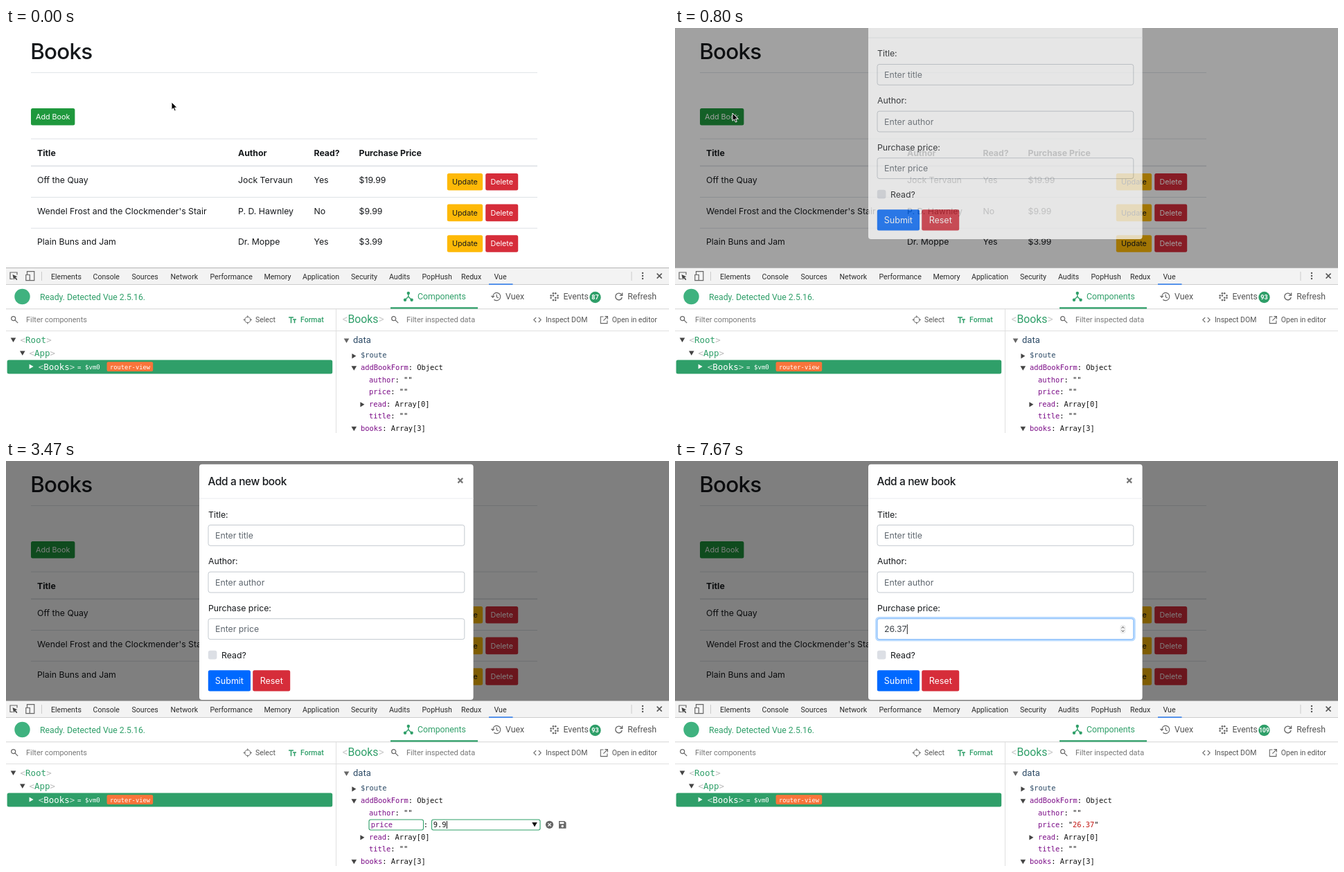
An HTML page that plays this animation: 957 px wide and 585 px high, repeating every 8 s.

```html
<!DOCTYPE html>
<html lang="en">
<head>
<meta charset="utf-8">
<title>Books</title>
<style>
html, body { margin: 0; width: 100%; height: 100%; overflow: hidden; background: #fff; }
svg { display: block; width: 100%; height: 100%; }
text { white-space: pre; }
.ui { font-family: Inter, sans-serif; }
.rb { font-family: Roboto, sans-serif; }
.mono { font-family: "DejaVu Sans Mono", monospace; }
</style>
</head>
<body>
<svg id="stage" viewBox="0 0 957 585"></svg>
<script>
const GREEN = '#2f9f69', INK = '#16191c', HINT = '#5f676f', RED = '#d62d3a', PURPLE = '#7b0c87', GRAY = '#666';
const stage = document.getElementById('stage');

// Markup helpers
const text = (cls, x, y, s, size, fill, more = '') =>
  `<text class="${cls}" x="${x}" y="${y}" font-size="${size}" fill="${fill}" ${more}>${s}</text>`;
const ui = (x, y, s, size = 12.3, fill = INK, more) => text('ui', x, y, s, size, fill, more);
const rb = (x, y, s, size = 10.5, fill = '#555', more) => text('rb', x, y, s, size, fill, more);
const mono = (x, y, s, fill = '#111', size = 10.4, more) => text('mono', x, y, s, size, fill, more);
const span = (s, fill) => `<tspan fill="${fill}">${s}</tspan>`;
const rect = (x, y, w, h, fill, r = 0, more = '') =>
  `<rect x="${x}" y="${y}" width="${w}" height="${h}" rx="${r}" fill="${fill}" ${more}/>`;
const path = (d, stroke, w = 1, fill = 'none', more = '') =>
  `<path d="${d}" stroke="${stroke}" stroke-width="${w}" fill="${fill}" ${more}/>`;
const group = (id, body, more = '') => `<g id="${id}" ${more}>${body}</g>`;
const button = (x, y, w, h, label, fill, size, ink = '#fff', id = '') =>
  rect(x, y, w, h, fill, 2.5, id && `id="${id}"`) +
  ui(x + w / 2, y + h / 2 + size * .365, label, size, ink, 'text-anchor="middle"');
const down = (x, y, fill = '#444') => path(`M${x - 3.8} ${y - 3}h7.6l-3.8 6.4z`, 'none', 0, fill);
const right = (x, y, fill = '#444') => path(`M${x - 2.6} ${y - 3.6}v7.2l6-3.6z`, 'none', 0, fill);
const search = (x, y) => path(`M${x + 1.2} ${y + 1.2}l4 4M${x + 1.7} ${y - 1.3}a3 3 0 1 1-6 0a3 3 0 1 1 6 0`, GRAY, 1.2);
const pencil = (x, y) => path(`M${x - 5} ${y + 5}v-2.4l6.3-6.3 2.4 2.4-6.3 6.3zM${x + 2.1} ${y - 4.5}l1.3-1.2 2.4 2.4-1.3 1.2z`, 'none', 0, GRAY);
const disc = (x, y, mark) => `<circle cx="${x}" cy="${y}" r="5.6" fill="${GRAY}"/>` + path(mark, '#fff', 1.2);

function page() {
  const books = [
    ['Off the Quay', 'Jock Tervaun', 'Yes', '$19.99'],
    ["Wendel Frost and the Clockmender's Stair", 'P. D. Hawnley', 'No', '$9.99'],
    ['Plain Buns and Jam', 'Dr. Moppe', 'Yes', '$3.99']
  ];
  const cols = [45, 335, 444.5, 509.5];
  const rule = (y, h = 1) => rect(36, y, 731, h, '#dee2e6');
  return rect(0, 0, 957, 346, '#fff') +
    ui(35.3, 44.6, 'Books', 31.4, INK, 'font-weight="500" letter-spacing="-.8"') +
    rule(64, .9) + rule(159.6) + rule(198.5, 1.7) + rule(244) + rule(288.7) +
    rect(35, 115, 65.4, 26.6, 'none', 3.5, 'id="glow" stroke="#28a745" stroke-opacity=".5" stroke-width="2"') +
    button(36, 116, 63.4, 24.5, 'Add Book', '#1f983d', 10.75, '#fff', 'add') +
    ['Title', 'Author', 'Read?', 'Purchase Price'].map((s, i) => ui(cols[i], 184.5, s, 12.3, INK, 'font-weight="700"')).join('') +
    books.map((b, r) => {
      const dy = r * 44.6;
      return b.map((s, i) => ui(cols[i], 224 + dy, s)).join('') +
        button(636.8, 210 + dy, 51.3, 24.6, 'Update', '#feb907', 10.75, INK) +
        button(692.2, 210 + dy, 47, 24.6, 'Delete', RED, 10.75);
    }).join('');
}

function modal() {
  const field = (y, label, hint, id = '') => ui(292, y - 11, label) +
    rect(292, y, 369.8, 29.8, '#fff', 3, `stroke="#c3c9cf" ${id && `id="${id}"`}`) +
    ui(302, y + 19.4, hint, 12.3, HINT, id && `id="${id}Text"`);
  return rect(279, 4.8, 395.6, 340.2, '#fff', 4) +
    ui(291.5, 34.7, 'Add a new book', 15.4, INK, 'font-weight="500" letter-spacing="-.35"') +
    path('M652.4 24.8l6.8 6.8m0-6.8l-6.8 6.8', '#777', 2.2) +
    rect(279, 53.6, 395.6, 1, '#e9ecef') +
    field(92.5, 'Title:', 'Enter title') +
    field(160.2, 'Author:', 'Enter author') +
    rect(290.6, 226.4, 372.6, 32.4, 'none', 4, 'id="ring" stroke="#007bff" stroke-opacity=".28" stroke-width="3"') +
    field(227.8, 'Purchase price:', 'Enter price', 'price') +
    rect(301.5, 236, 28, 14, '#b3d7ff', 0, 'id="sel" style="mix-blend-mode:multiply"') +
    rect(0, 236, 1, 14, '#222', 0, 'id="caret"') +
    group('spin', rect(643, 237.3, 7, 11.4, '#f3f3f3', 3, 'stroke="#ddd" stroke-width=".6"') +
      path('M644.7 241.6l1.8-2.3 1.8 2.3m0 2.8l-1.8 2.3-1.8-2.3', '#555')) +
    rect(291.8, 273.8, 12.6, 12.6, '#dcdfe5', 3) +
    ui(311, 284.7, 'Read?') +
    button(291.8, 302.2, 61.2, 30.2, 'Submit', '#0069ff', 12.5) +
    button(356.2, 302.2, 54, 30.2, 'Reset', RED, 12.5);
}

function devtools() {
  const tabs = { Elements: 65, Console: 125.5, Sources: 181.5, Network: 237.5, Performance: 294.5, Memory: 372.5,
    Application: 428, Security: 498, Audits: 553, PopHush: 600.5, Redux: 657, Vue: 704.5 };
  const tag = (x, y, name, ink, edge) => mono(x, y, span('&lt;', edge) + name + span('&gt;', edge), ink, 12.5);
  let bar = rect(0, 346, 957, 239, '#fff') + rect(0, 346, 957, 25, '#f3f3f3') +
    rect(0, 346, 957, 1, '#b5b5b5') + rect(0, 370, 957, 1, '#ccc') +
    path('M10 362.5H6V353h10v3.5', GRAY, 1.2) + path('M9.5 356l7 3.2-2.9.9 2.8 3-1.2 1.2-2.8-3-1.2 2.7z', 'none', 0, '#444') +
    path('M30.5 356v-4.4h10.3v13h-6M28.8 356.5h5.5v8.2h-5.5z', GRAY, 1.2) +
    rect(51, 352, 1, 13, '#ccc') + rect(902.5, 352, 1, 13, '#ccc') +
    [354, 358, 362].map(y => `<circle cx="919" cy="${y}" r="1.2" fill="#555"/>`).join('') +
    path('M939.6 354.6l7 7m0-7l-7 7', '#555', 1.5) +
    rect(697, 369.3, 34.5, 1.7, '#3b82e8');
  for (const name in tabs) bar += rb(tabs[name], 362.7, name, 10.6, '#2b2b2b');

  const header = `<circle cx="23.5" cy="388" r="11.2" fill="#3fb27f"/>` +
    rb(49, 392.8, 'Ready. Detected Vue 2.5.16.', 12.25, GREEN) +
    rect(0, 405, 957, 1.4, '#e0e0e0') + rect(555, 403.3, 126, 2.3, GREEN) +
    path('M580.8 383v5l-4.4 4.6m4.4-4.6l4.4 4.6', GREEN, 1.4) +
    [[580.8, 383], [576, 392.8], [585.6, 392.8]].map(([x, y]) => `<circle cx="${x}" cy="${y}" r="2.2" fill="${GREEN}"/>`).join('') +
    rb(594, 392.4, 'Components', 12.25, GREEN) +
    path('M702.6 388a5.6 5.6 0 1 1 1.8 4.2M700.4 386.8l2.2 2.4 2.4-2.4M708.2 384.8v3.6l2.6 1.6', GRAY, 1.2) +
    rb(721, 392.4, 'Vuex', 12.25) +
    [0, 1, 2, 3].map(i => [0, 1, 2, 3].map(j => (i + j) % 3 ? `<circle cx="${786.6 + i * 3.3}" cy="${383.2 + j * 3.3}" r="1.3" fill="${GRAY}"/>` : '').join('')).join('') +
    rb(804.5, 392.4, 'Events', 12.25) +
    `<circle cx="850.5" cy="389" r="8.2" fill="${GREEN}"/>` +
    rb(850.5, 392.2, '87', 9, '#fff', 'id="count" font-weight="700" text-anchor="middle"') +
    path('M888.6 385.4a4.8 4.8 0 1 0 .6 3.6M889.6 382.6v3.8h-3.8', GRAY, 1.4) +
    rb(897.2, 392.4, 'Refresh', 12.25);

  const filters = rect(0, 437, 957, 1, '#e0e0e0') + rect(476, 406, 1, 179, '#e0e0e0') +
    search(12, 421) + rb(29, 425.4, 'Filter components', 10.9, '#777') +
    `<circle cx="348.8" cy="421.5" r="4.2" fill="none" stroke="${GRAY}"/>` +
    path('M348.8 415.3v3m0 6.4v3m-6.2-6.2h3m6.4 0h3', GRAY) + rb(360, 425.2, 'Select') +
    path('M408 418h7m-3.5 0v8.2M414 421h5m-2.5 0v5.2', GREEN, 1.6) + rb(425, 425.2, 'Format', 10.5, GREEN, 'font-weight="500"') +
    rb(485.4, 425.8, span('&lt;', '#ccc') + 'Books' + span('&gt;', '#ccc'), 15.8, GREEN) +
    search(561, 421) + rb(578, 425.4, 'Filter inspected data', 10.95, '#777') +
    path('M765.2 418.2l-3.4 3.4 3.4 3.4m3.6-6.8l3.4 3.4-3.4 3.4', GRAY, 1.1) + rb(779, 425.2, 'Inspect DOM') +
    path('M862.5 417h-4.2v9.6h9.6v-4.2M864.4 416.6h4v4m0-4l-6 6', GRAY, 1.1) + rb(874.8, 425.2, 'Open in editor');

  const tree = down(10.5, 450.5) + tag(20.5, 455, 'Root', GREEN, '#bbb') +
    down(23.8, 469.5) + tag(33.5, 474, 'App', GREEN, '#bbb') +
    rect(1.6, 479.4, 469.6, 20, GREEN, 2.5) + right(36.2, 489, '#fff') +
    tag(46.7, 494, 'Books', '#fff', '#c5e3d4') +
    mono(103, 493.2, '= $vm0', '#fff', 9.1) +
    rect(145.6, 482.2, 66.6, 13.8, '#f9743a', 2) + mono(150, 492.6, 'router-view', '#fff', 8.76);

  const prop = (x, y, key, value) => mono(x, y + 4, span(key, PURPLE) + ': ' + value);
  const inspector = down(491.5, 451.5, GRAY) + rb(501, 454.8, 'data', 13, '#2c4a66') +
    right(502, 473.8) + mono(512, 476.2, '$route', '#2c4a66') +
    down(502.3, 491.3) + prop(512, 490, 'addBookForm', 'Object') +
    group('formTools', pencil(643, 490) + disc(662, 490, 'M659 490h6m-3-3v6')) +
    prop(524, 508, 'author', '""') +
    group('shown', prop(524, 525.3, 'price', '<tspan id="value"></tspan>') + group('priceTool', pencil(592, 525))) +
    group('editor', [[524, 78.5], [614.5, 156.5]].map(([x, w]) => rect(x, 518, w, 15, '#fff', 2.5, `stroke="${GREEN}" stroke-width="1.1"`)).join('') +
      mono(526.8, 529, 'price', PURPLE) + mono(602.8, 529, ':') +
      rect(616.5, 519.5, 13, 12, '#b3d7ff', 0, 'id="editSel"') +
      mono(616.8, 529, '', '#111', 10.4, 'id="draft"') + rect(0, 520, 1, 11, '#111', 0, 'id="editCaret"') +
      down(763, 525, '#111') + disc(784.5, 525.3, 'M782.3 523.1l4.4 4.4m0-4.4l-4.4 4.4') +
      group('save', path('M798 520h8.2l2.3 2.3v8.4H798z', 'none', 0, GRAY) + rect(799.4, 521.4, 6, 2.8, '#fff') + '<circle cx="803.2" cy="527.5" r="1.7" fill="#fff"/>')) +
    right(514, 543.8) + prop(524, 543, 'read', 'Array[0]') +
    prop(524, 560.2, 'title', '""') +
    down(502.3, 578.8) + prop(512, 577.6, 'books', 'Array[3]');

  return bar + header + filters + tree + inspector;
}

stage.innerHTML = page() +
  rect(0, 0, 957, 346, '#000', 0, 'id="shade"') + group('modal', modal()) + devtools() +
  group('arrow', path('M0 0V11.2L2.6 8.8 4.4 13 6.3 12.2 4.5 8.1H8z', '#fff', 1, '#000')) +
  group('hand', path('M-1.1 1.2Q0-.5 1.1 1.2L2 5 7.6 6Q9.7 6.6 9.4 9L8.4 13.6H1.8L-3 9Q-2.6 7-.3 8z', '#222', 1, '#fff')) +
  group('beam', path('M-2.6-6Q0-6 0-4.4 0-6 2.6-6M0-4.6V4.6M-2.6 6Q0 6 0 4.4 0 6 2.6 6M-1.4 1.6H1.4', '#111', 1.1));

const el = {};
stage.querySelectorAll('[id]').forEach(e => el[e.id] = e);
const show = (e, on) => e.style.display = on ? '' : 'none';
const clamp = v => Math.max(0, Math.min(1, v));
const latest = (t, list) => list.filter(([s]) => s <= t).pop()[1];

// CSS ease-out, cubic-bezier(0, 0, .58, 1)
function easeOut(x) {
  let lo = 0, hi = 1;
  for (let i = 0; i < 24; i++) {
    const s = (lo + hi) / 2;
    if (1.74 * s * s - .74 * s ** 3 < x) lo = s; else hi = s;
  }
  return 3 * lo * lo - 2 * lo ** 3;
}

const OPEN = 694;
const route = [[0, 239, 107], [600, 83, 123], [870, 83, 123], [1470, 581, 498], [1600, 589, 522], [2070, 589, 524],
  [2330, 639, 525], [3930, 639, 525], [4000, 672, 520], [4070, 800, 523], [4670, 800, 523], [4930, 431, 259],
  [5070, 431, 259], [5330, 399, 245], [6070, 399, 245], [6130, 280, 245], [8010, 280, 245]];
const pointers = [[0, 'arrow'], [1400, 'hand'], [1800, 'beam'], [2930, ''], [4000, 'arrow'], [5130, 'beam'], [6200, '']];
const counts = [[0, 87], [670, 90], [730, 93], [4270, 94], [4400, 95], [5670, 96], [6130, 97], [6200, 99], [6400, 101],
  [6470, 102], [6930, 103], [7130, 104], [7330, 105], [7400, 106], [7600, 108], [7670, 109]];
const drafts = [[0, '""'], [2930, '9'], [3200, '9.'], [3470, '9.9'], [3670, '9.99']];
const entries = [[0, ''], [4270, '9.99'], [6200, '2'], [6400, '26'], [6930, '26.'], [7330, '26.3'], [7600, '26.37']];
const values = [[0, ''], [4270, '9.99'], [6200, '2'], [6470, '26'], [7400, '26.3'], [7670, '26.37']];

function pointerAt(t) {
  const i = route.findIndex(p => p[0] > t);
  const [a, x, y] = route[i - 1], [b, u, v] = route[i];
  const p = (t - a) / (b - a), s = p * p * (3 - 2 * p);
  return [x + (u - x) * s, y + (v - y) * s];
}

function placeCaret(caret, label, x) {
  caret.setAttribute('x', x + label.getComputedTextLength() + .3);
}

function draw(t) {
  const fade = clamp((t - OPEN) / 150);
  el.shade.setAttribute('opacity', fade / 2);
  el.modal.setAttribute('opacity', fade);
  el.modal.setAttribute('transform', `translate(0 ${-85.2 * (1 - easeOut(clamp((t - OPEN) / 300)))})`);
  show(el.glow, t >= 600 && t < 800);
  el.add.setAttribute('fill', t >= 530 && t < 800 ? '#1c8a36' : '#1f983d');

  const n = latest(t, counts);
  el.count.textContent = n;
  el.count.setAttribute('font-size', n > 99 ? 8.3 : 9);

  // Inspector row
  const editing = t >= 1800 && t < 4270, value = latest(t, values);
  show(el.editor, editing);
  show(el.shown, !editing);
  show(el.formTools, t >= 1400 && t < 1530);
  show(el.priceTool, t >= 1530 && t < 1800);
  el.value.innerHTML = t >= 4270 && t < 6200 ? span(value, '#1a3fc4') : '"' + span(value, '#c41a16') + '"';
  if (editing) {
    const draft = latest(t, drafts);
    el.draft.textContent = draft;
    show(el.editSel, t >= 2270 && t < 2930);
    show(el.editCaret, t >= 2930);
    show(el.save, draft !== '9.');
    placeCaret(el.editCaret, el.draft, 616.8);
  }

  // Price field
  const entry = latest(t, entries), focus = clamp((t - 5600) / 150);
  el.priceText.textContent = entry || 'Enter price';
  el.priceText.setAttribute('fill', entry ? '#3c4248' : HINT);
  el.price.setAttribute('stroke', focus ? '#80b8fa' : '#c3c9cf');
  el.ring.setAttribute('opacity', focus);
  show(el.spin, t >= 5200);
  show(el.sel, t >= 6130 && t < 6200);
  show(el.caret, t >= 5670 && !(t >= 6130 && t < 6200));
  placeCaret(el.caret, el.priceText, 302);

  const kind = latest(t, pointers), [x, y] = pointerAt(t);
  for (const id of ['arrow', 'hand', 'beam']) {
    show(el[id], id === kind);
    el[id].setAttribute('transform', `translate(${x.toFixed(1)} ${y.toFixed(1)})`);
  }
}

// The screen is redrawn 15 times per second; LEAD covers times rounded to 10 ms
const STEP = 1000 / 15, LEAD = 4;
function tick() {
  const k = Math.floor((performance.now() % 8000 + LEAD) / STEP) % 120;
  draw(k * STEP + LEAD);
  requestAnimationFrame(tick);
}
tick();
</script>
</body>
</html>
```
